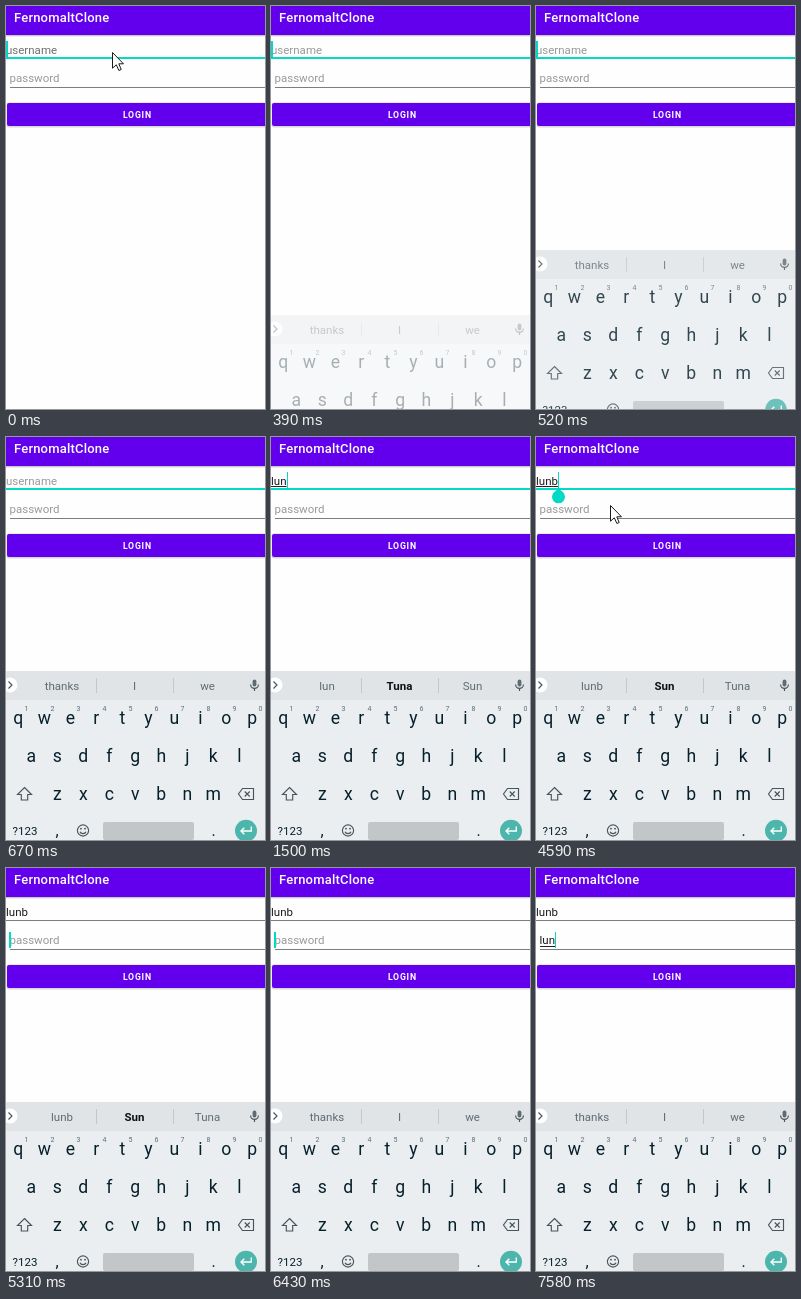
An HTML page that plays this animation: 259x403 px, repeating every 8 s.

```html
<!DOCTYPE html>
<html lang="en">
<head>
<meta charset="utf-8">
<title>Login screen</title>
<style>
  html, body { margin: 0; width: 100%; height: 100%; overflow: hidden; background: #fefefe; }
  svg { display: block; width: 259px; height: 403px; }
  text { font-family: Roboto, "Open Sans", sans-serif; }
  .mid { text-anchor: middle; }
  .icon { fill: none; stroke: #4a555b; stroke-width: 1.15; }
</style>
</head>
<body>
<svg id="stage" viewBox="0 0 259 403" xmlns="http://www.w3.org/2000/svg">
  <rect width="259" height="403" fill="#fefefe"/>
  <rect y="29" width="259" height="1" fill="#c9c9c9"/>
  <rect y="30" width="259" height="1" fill="#ececec"/>
  <rect width="259" height="29" fill="#6200ee"/>
  <text x="8" y="16" font-size="13" font-weight="500" letter-spacing=".2" fill="#fff">FernomaltClone</text>

  <rect id="userLine"/>
  <text id="user" x="0" y="48" font-size="11.5"></text>
  <rect id="userMark" x="0" y="49" height="1" fill="#222"/>
  <rect id="userCaret" y="35" height="16" fill="#03dac5"/>
  <path id="handle" d="M22.5 51.5 L27.1 55.2 A6.5 6.5 0 1 1 17.9 55.2 Z" fill="#03dac5"/>

  <rect x="4" y="81" width="255" height="1" fill="#7d7d7d"/>
  <text id="pass" x="3.5" y="76" font-size="11.5"></text>
  <rect id="passMark" x="4" y="78" height="1" fill="#222"/>
  <rect id="passCaret" y="64" height="16" fill="#03dac5"/>

  <rect x=".5" y="96.6" width="262" height="25" rx="2.5" fill="#d8d8d8"/>
  <rect x="1" y="97" width="262" height="23" rx="2" fill="#6200ee"/>
  <text class="mid" x="131.4" y="112" font-size="8.7" font-weight="700" letter-spacing=".8" fill="#fff">LOGIN</text>

  <g id="board">
    <rect y="234" width="259" height="180" fill="#eaeef1"/>
    <rect y="234" width="259" height="29" fill="#e0e4e7"/>
    <circle cx="4" cy="248" r="7.5" fill="#fff"/>
    <path class="icon" d="M2.5 244.5 L6 248 L2.5 251.5"/>
    <path d="M90.5 241V256M167.5 241V256" stroke="#c3c8cb"/>
    <g id="words"></g>
    <rect x="246.6" y="242.5" width="3.8" height="7" rx="1.9" fill="#5f6b72"/>
    <path class="icon" d="M244.6 247.5a3.9 3.9 0 0 0 7.8 0M248.5 251.5v2.6"/>
    <g id="keys" fill="#06202b"></g>
    <path class="icon" d="M18.5 350.5 L25.5 357.5 H21.7 V363 H15.3 V357.5 H11.5 Z"/>
    <path class="icon" d="M236.5 351.5 H247.5 V362.5 H236.5 L232.5 357 Z M238.7 354.5l5 5m0 -5l-5 5"/>
    <circle class="icon" cx="77" cy="393.5" r="5.6"/>
    <path class="icon" d="M74 394.8a3.2 2.8 0 0 0 6 0"/>
    <circle cx="75" cy="391.7" r=".9" fill="#4a555b"/>
    <circle cx="79" cy="391.7" r=".9" fill="#4a555b"/>
    <rect x="97" y="385" width="91" height="18" rx="2" fill="#c2c6c9"/>
    <circle cx="240" cy="393.7" r="11" fill="#4db6ac"/>
    <path d="M245.3 389.5V394H235M238.3 390.7L235 394L238.3 397.3" fill="none" stroke="#fff" stroke-width="1.4"/>
  </g>

  <path id="pointer" d="M.5 .5V16.2L4.3 12.8L6.9 18.5L9.2 17.5L6.8 11.8H11.5Z" fill="#fff" stroke="#1a1a1a" stroke-linejoin="round"/>
</svg>
<script>
const LOOP = 8000;
const $ = id => document.getElementById(id);

function set(el, attrs) {
  for (const k in attrs) el.setAttribute(k, attrs[k]);
}

function addText(parent, x, y, size, str, extra = {}) {
  const el = document.createElementNS("http://www.w3.org/2000/svg", "text");
  set(el, { class: "mid", x, y, "font-size": size, ...extra });
  el.textContent = str;
  parent.append(el);
  return el;
}

function addRow(letters, x0, y) {
  [...letters].forEach((c, i) => addText($("keys"), x0 + 26 * i, y, 17.6, c));
}

addRow("qwertyuiop", 12.3, 287);
addRow("asdfghjkl", 25.3, 325);
addRow("zxcvbnm", 51.3, 362.5);
[..."1234567890"].forEach((c, i) =>
  addText($("keys"), 20.5 + 26 * i, 274, 7, c, { fill: "#5f6b72" }));
addText($("keys"), 19, 398, 11.5, "?123");
addText($("keys"), 51, 398.5, 16, ",");
addText($("keys"), 207.5, 398.5, 16, ".");
const words = [56, 128.5, 201.5].map(x => addText($("words"), x, 253, 11.5, ""));

// Each track is a list of [start time, value]; values hold until the next one.
const idle = ["thanks", "I", "we"];
const tracks = {
  pointer: [[0, [106, 46]], [120, [150, 62]], [270, null], [2950, [111, 54]],
    [3230, [109, 55]], [3355, [107, 55]], [3480, [105, 55]],
    [4070, [98, 58]], [4195, [84, 64]], [4320, [74, 68]], [5310, null]],
  board: [[0, null], [270, [75, .35]], [395, [32, .6]], [520, [10, .82]], [670, [0, 1]]],
  user: [[0, ""], [1230, "l"], [1380, "lu"], [1500, "lun"], [1780, "lunb"]],
  pass: [[0, ""], [7090, "l"], [7580, "lun"]],
  words: [[0, idle], [1230, ["l", "I", "la"]], [1380, ["lu", "Lid", "Let"]],
    [1500, ["lun", "Tuna", "Sun"]], [1780, ["lunb", "Sun", "Tuna"]], [5730, idle]],
  userCaret: [[0, true], [670, false], [1230, true], [2240, false], [2650, true],
    [3230, false], [3630, true], [4070, false], [4590, true], [5170, false]],
  passCaret: [[0, false], [4910, true], [6030, false], [6430, true]],
  handle: [[0, false], [4195, true], [5170, false]],
  focus: [[0, true], [5170, false]],
  hint: [[0, "#707070"], [120, "#999"]]
};

function at(name, t) {
  let v;
  for (const [start, value] of tracks[name]) if (t >= start) v = value;
  return v;
}

function show(el, on) {
  el.style.display = on ? "" : "none";
}

function drawField(id, x, value, hint, color, composing, caretOn) {
  const el = $(id), mark = $(id + "Mark"), caret = $(id + "Caret");
  el.textContent = value || hint;
  set(el, { fill: value ? "#1b1b1b" : color });
  const w = value ? el.getComputedTextLength() : 0;
  set(mark, { width: w });
  show(mark, value && composing);
  set(caret, { x: Math.round(x + w), width: value ? 1 : 2 });
  show(caret, caretOn);
}

function render(t) {
  const focus = at("focus", t);
  drawField("user", 0, at("user", t), "username", at("hint", t), focus, at("userCaret", t));
  drawField("pass", 3.4, at("pass", t), "password", "#999", true, at("passCaret", t));
  set($("userLine"), focus
    ? { x: 0, y: 51, width: 259, height: 2, fill: "#03dac5" }
    : { x: 0, y: 52, width: 259, height: 1, fill: "#7d7d7d" });
  show($("handle"), at("handle", t));

  const list = at("words", t);
  words.forEach((el, i) => {
    const bold = i === 1 && list !== idle;
    el.textContent = list[i];
    set(el, { fill: bold ? "#111" : "#606b71", "font-weight": bold ? 700 : 400 });
  });

  const board = at("board", t);
  show($("board"), board);
  if (board) set($("board"), { transform: `translate(0 ${board[0]})`, opacity: board[1] });

  const p = at("pointer", t);
  show($("pointer"), p);
  if (p) set($("pointer"), { transform: `translate(${p})` });
}

const begin = performance.now();
function tick(now) {
  render(Math.max(0, now - begin) % LOOP);
  requestAnimationFrame(tick);
}
render(0);
requestAnimationFrame(tick);
</script>
</body>
</html>
```
